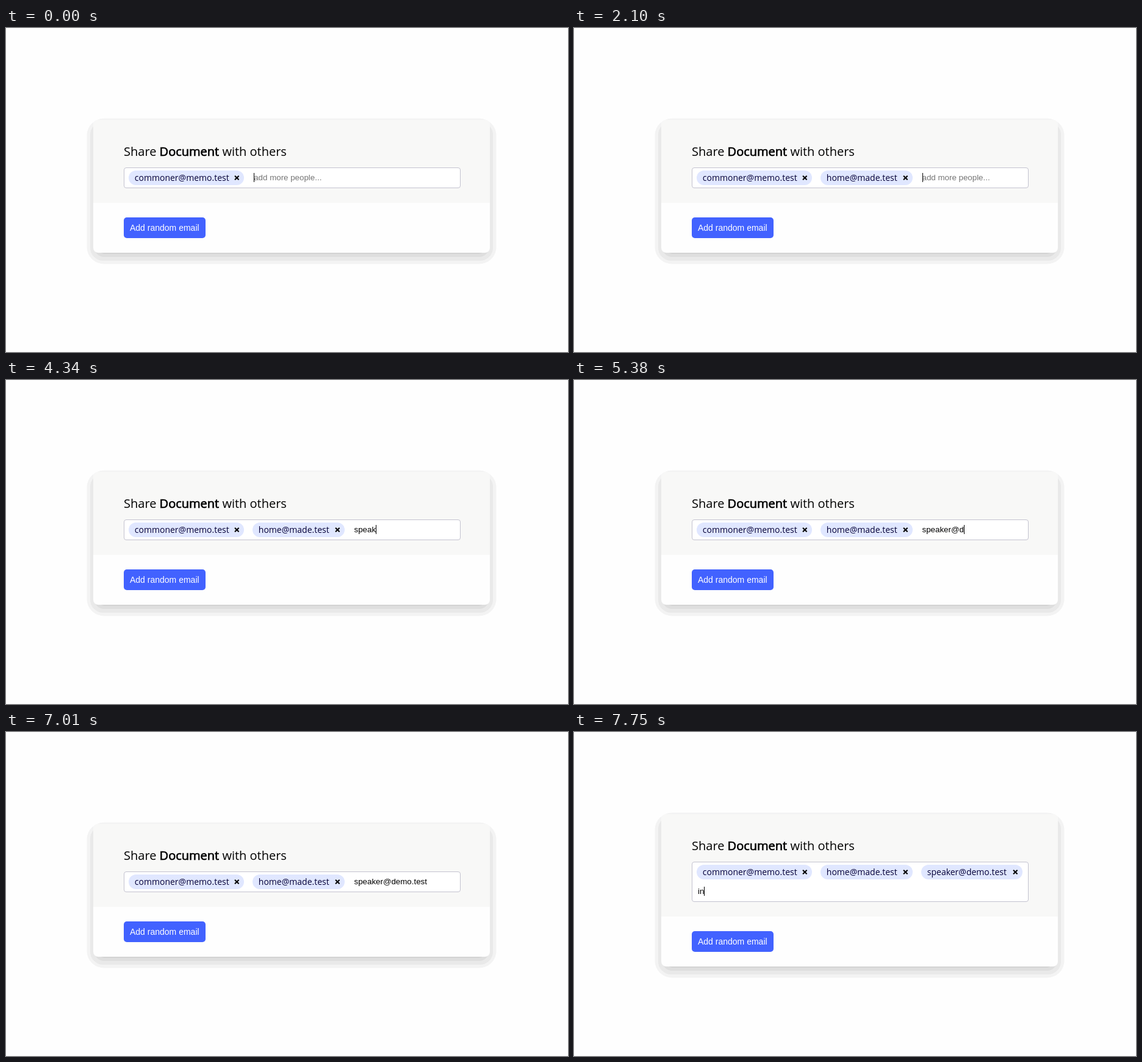
Recreate the animation shown at these times as an HTML page. Size 921x532 px, loop 8000 ms.

```html
<!DOCTYPE html>
<html lang="en">
<head>
<meta charset="utf-8">
<title>Share document</title>
<style>
  html, body { margin: 0; width: 100%; height: 100%; overflow: hidden; background: #fefefe; }
  svg { display: block; width: 100%; height: 100%; }
  text { white-space: pre; }
  .title { font: 20px "Open Sans", sans-serif; }
  .strong { stroke: #000; stroke-width: .7px; }
  .chip text { font: 14px "Open Sans", sans-serif; fill: #050038; }
  .chip rect { fill: #e0e7ff; }
  .chip path { stroke: #000; stroke-width: 2px; }
  .input { font: 13.333px "Liberation Sans", Arial, sans-serif; }
  .button { font: 14px "Liberation Sans", Arial, sans-serif; fill: #fff; }
</style>
</head>
<body>
<svg id="stage" viewBox="0 0 921 532">
  <g id="shadow"></g>
  <rect id="card" x="143" width="650" rx="8" fill="#fefefe"/>
  <path id="header" fill="#f8f8f7"/>
  <g id="top">
    <text class="title" x="193" y="210">Share <tspan class="strong">Document</tspan> with others</text>
    <rect id="field" x="193.5" y="229.5" width="551" rx="3.5" fill="#fff" stroke="#c3c2cf"/>
    <g id="chips"></g>
    <text id="input" class="input"></text>
    <rect id="caret" width="1" height="15"/>
  </g>
  <g id="bottom">
    <rect x="193" y="311" width="134" height="34" rx="5" fill="#4262ff"/>
    <text class="button" x="203" y="333">Add random email</text>
  </g>
</svg>
<script>
const LOOP = 8000;
const PASTE = 2100, ENTER = 7160;
const TYPED = "speaker@demo.test";
const PLACEHOLDER = "add more people...";

// left, right, label, time of appearance
const CHIPS = [
  [201, 390, "commoner@memo.test", 0],
  [404, 555, "home@made.test", PASTE],
  [569, 735, TYPED, ENTER]
];
// spread around the shadow box, corner radius, colour
const SHADOWS = [
  [10.5, 28, "#f3f3f3"],
  [5, 21, "#e9e9e9"],
  [-1, 17, "#dedede"],
  [-6, 14, "#d3d3d3"]
];
const KEY_TIMES = [3750, 3900, 4040, 4190, 4340, 4480, 4630, 4930,
  5380, 5520, 5670, 5820, 6120, 6270, 6410, 6560];
const CARET_OFF = [[300, 750], [1200, 1800], [2250, 2700], [3300, 3750], [7010, ENTER]];

const $ = id => document.getElementById(id);

function set(el, attrs) {
  for (const k in attrs) el.setAttribute(k, attrs[k]);
  return el;
}
function add(parent, tag, attrs) {
  const el = document.createElementNS("http://www.w3.org/2000/svg", tag);
  return parent.appendChild(set(el, attrs));
}

const shadows = SHADOWS.map(([d, rx, fill]) =>
  add($("shadow"), "rect", { x: 143 - d, width: 650 + 2 * d, rx, fill }));

const chips = CHIPS.map(([left, right, label]) => {
  const g = add($("chips"), "g", { class: "chip" });
  add(g, "rect", { x: left, y: 234, width: right - left, height: 24, rx: 12 });
  add(g, "text", { x: left + 9.8, y: 251 }).textContent = label;
  add(g, "path", { d: `M${right - 15} 242.7l6.6 6.6m0 -6.6l-6.6 6.6` });
  return g;
});

function typedAt(t) {
  if (t >= ENTER) return t >= 7750 ? "in" : t >= 7450 ? "i" : "";
  const n = KEY_TIMES.filter(k => k <= t).length;
  return TYPED.slice(0, n === KEY_TIMES.length ? TYPED.length : n);
}

function layout(grow) {
  const top = 151 - grow, height = 218 + 2 * grow, fold = 287 + grow;
  set($("card"), { y: top, height });
  set($("header"), { d: `M143 ${fold}V${top + 8}q0 -8 8 -8H785q8 0 8 8V${fold}z` });
  shadows.forEach((el, i) => {
    const d = SHADOWS[i][0];
    set(el, { y: top + 8 - d, height: height + 2 * d });
  });
  set($("top"), { transform: `translate(0 ${-grow})` });
  set($("field"), { height: 33 + 2 * grow });
  set($("bottom"), { transform: `translate(0 ${grow})` });
}

function draw(t) {
  const wrapped = t >= ENTER;
  layout(wrapped ? 16 : 0);
  chips.forEach((g, i) => set(g, { display: t >= CHIPS[i][3] ? "inline" : "none" }));

  const typed = typedAt(t);
  const x = wrapped ? 203 : t >= PASTE ? 570.5 : 406.2;
  const y = wrapped ? 282 : 250;
  const input = $("input");
  input.textContent = typed || PLACEHOLDER;
  set(input, { x, y, fill: typed ? "#000" : "#757575" });

  const end = x + (typed ? input.getComputedTextLength() : 0);
  const off = CARET_OFF.some(([a, b]) => t >= a && t < b);
  set($("caret"), { x: Math.round(end), y: y - 12, display: off ? "none" : "inline" });
}

const start = performance.now();
function tick() {
  draw((performance.now() - start) % LOOP);
  requestAnimationFrame(tick);
}
tick();
</script>
</body>
</html>
```
